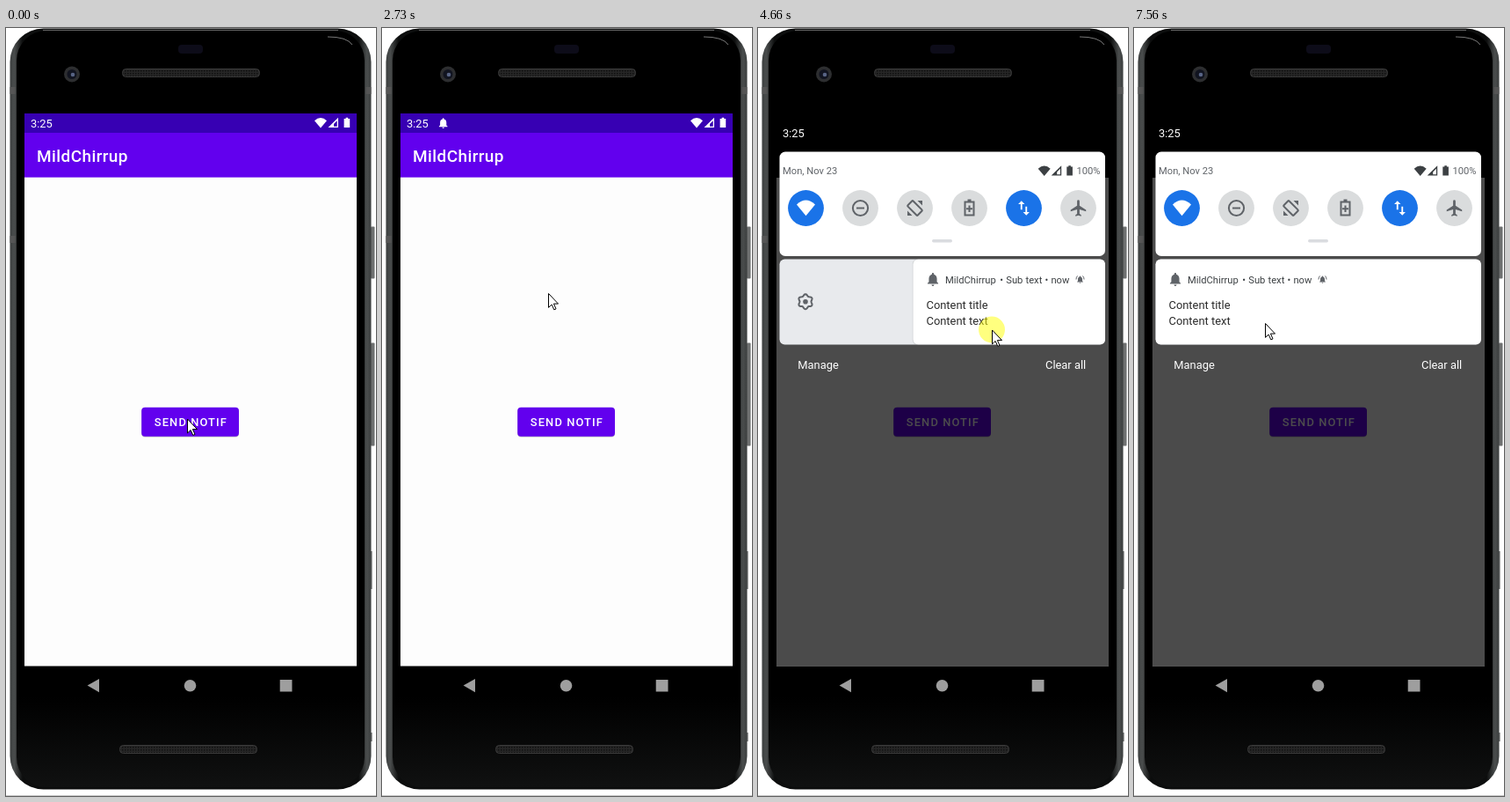
These frames come from a looping animation (421x872 px, 7730 ms). An HTML page:

```html
<!DOCTYPE html>
<html lang="en">
<head>
<meta charset="utf-8">
<title>Notification demo</title>
<style>
  html, body { margin: 0; width: 100%; height: 100%; overflow: hidden; background: #fff; }
  svg { display: block; width: 100vw; height: 100vh; }
  text { font-family: Roboto, sans-serif; font-size: 12.9px; white-space: pre; }
  .medium { font-weight: 500; }
  .small { font-size: 11.2px; }
  .line { fill: none; stroke: #5f6368; stroke-width: 2; }
</style>
</head>
<body>
<svg viewBox="0 0 421 872">
  <defs>
    <linearGradient id="shell" x2="1" y2="0">
      <stop offset="0" stop-color="#3c3f3f"/><stop offset=".012" stop-color="#4a4d4d"/>
      <stop offset=".035" stop-color="#0c0d0d"/><stop offset=".965" stop-color="#0c0d0d"/>
      <stop offset=".988" stop-color="#4a4d4d"/><stop offset="1" stop-color="#3c3f3f"/>
    </linearGradient>
    <linearGradient id="glass" x2="0" y2="1">
      <stop offset=".88" stop-color="#000"/><stop offset="1" stop-color="#101111"/>
    </linearGradient>
    <pattern id="mesh" width="3" height="3" patternUnits="userSpaceOnUse">
      <rect width="3" height="3" fill="#262626"/><rect width="1.5" height="1.5" fill="#101010"/>
    </pattern>
    <clipPath id="cardClip"><rect id="cardMask" x="24.5" y="262.5" width="370.5" height="97" rx="6"/></clipPath>
    <path id="fan" d="M0 3.3Q7-3.2 14 3.3L7 11.5Z"/>
    <path id="signal" fill-rule="evenodd" d="M11.5 0V11.3H0ZM10.2 3.5V10H6.5V7.2Z"/>
    <path id="battery" d="M2 0H4.6V1.2H6.6V11.3H0V1.2H2Z"/>
    <path id="bell" d="M0 10c1.1 0 2-.9 2-2h-4c0 1.1.9 2 2 2zm6-6v-5c0-3.07-1.64-5.64-4.5-6.32V-8c0-.83-.67-1.5-1.5-1.5S-1.5-8.83-1.5-8v.68C-4.37-6.64-6-4.08-6-1v5l-2 2v1H8V6z"/>
  </defs>

  <!-- phone -->
  <g fill="#6e7070">
    <rect x="415" y="225.5" width="4.5" height="59" rx="1"/>
    <rect x="415" y="357.5" width="4.5" height="117" rx="1"/>
    <path d="M415 594h1.6v43H415zM415 800h1.6v10H415z"/>
  </g>
  <rect x="4.5" y=".5" width="411" height="864" rx="38" fill="url(#shell)"/>
  <path d="M4.5 67h6v8h-6zM4.5 236h6v8h-6zM409.5 67h6v8h-6z" fill="#555"/>
  <rect x="12" y="3" width="396" height="859" rx="34" fill="url(#glass)"/>
  <path d="M42 2.5H378" stroke="#666"/>
  <path d="M366 10Q388 10 394 19" fill="none" stroke="#aaa" opacity=".7"/>
  <path d="M0 871.5H421" stroke="#c8c8c8"/>
  <rect x="196" y="19" width="28" height="10" rx="4" fill="#0d0c19"/>
  <circle cx="75" cy="52.5" r="9" fill="#2d2e30"/>
  <circle cx="75" cy="52.5" r="5.5" fill="#111420"/>
  <circle cx="76" cy="53" r="2.3" fill="#586485"/>
  <g fill="url(#mesh)" stroke="#3b3b3b">
    <rect x="132.5" y="46.5" width="156" height="9" rx="4"/>
    <rect x="129.5" y="814.5" width="156" height="9" rx="4"/>
  </g>
  <g fill="#9e9e9e">
    <path d="M92.6 746.5L106 739V754.2Z"/><circle cx="209.5" cy="746.7" r="6.8"/>
    <rect x="311.7" y="740" width="13.8" height="13.5"/>
  </g>

  <!-- app -->
  <rect x="21" y="97" width="378" height="627.5" fill="#fdfdfd"/>
  <rect x="21" y="119" width="378" height="50.6" fill="#6200ee"/>
  <rect x="21" y="97" width="378" height="22" fill="#3700b3"/>
  <g fill="#fff">
    <text x="28" y="112.6">3:25</text>
    <use href="#bell" id="statusBell" transform="translate(69.7 108) scale(.6)"/>
    <use href="#fan" x="351" y="102"/><use href="#signal" x="366.5" y="101.7"/><use href="#battery" x="384.6" y="101.7"/>
    <text class="medium" x="35" y="152" style="font-size:19px;letter-spacing:.4px">MildChirrup</text>
  </g>
  <rect x="154.2" y="431.6" width="110.8" height="33" rx="4" opacity=".25"/>
  <rect x="154.2" y="430.7" width="110.8" height="33" rx="4" fill="#6200ee"/>
  <rect id="ripple" x="154.2" y="430.7" width="110.8" height="33" rx="4" fill="#fff"/>
  <text class="medium" x="168.8" y="452.2" fill="#fff" style="letter-spacing:1.12px">SEND NOTIF</text>

  <!-- notification shade -->
  <g id="shade">
    <rect x="21" y="97" width="378" height="627.5" opacity=".7"/>
    <rect x="21" y="97" width="378" height="73"/>
    <text x="28" y="124" fill="#fff">3:25</text>
    <g id="panels">
      <rect x="24.5" y="140.5" width="370.5" height="118.5" rx="6.5" fill="#fff"/>
      <g fill="#5f6368">
        <text class="small" x="28" y="166">Mon, Nov 23</text>
        <text class="small" x="362.5" y="166">100%</text>
      </g>
      <g fill="#3c4043">
        <use href="#fan" x="318.7" y="156.5"/><use href="#signal" x="333.7" y="156.3"/><use href="#battery" x="351.3" y="156.3"/>
      </g>
      <g id="tiles"></g>
      <rect x="198" y="240" width="23" height="3.5" rx="1.7" fill="#dadce0"/>
      <g clip-path="url(#cardClip)">
        <rect x="24" y="262" width="372" height="98" fill="#e8eaed"/>
        <g id="gear" transform="translate(54 310.7)">
          <path id="gearRim" class="line" stroke-linejoin="round"/>
          <circle r="2.8" fill="#5f6368"/>
        </g>
        <g id="card">
          <rect x="23.7" y="262" width="372" height="98" rx="6" opacity=".1"/>
          <rect id="cardFace" x="24.5" y="262.5" width="370.5" height="97" rx="6" fill="#fff"/>
          <g fill="#5f6368">
            <use href="#bell" transform="translate(47 285.3) scale(.76)"/>
            <use href="#bell" transform="translate(214.5 285.6) scale(.42)"/>
            <path d="M211.5 281.5Q210 283 210 285.5M217.5 281.5Q219 283 219 285.5" fill="none" stroke="#5f6368"/>
          </g>
          <g fill="#3c4043">
            <text class="small" x="61" y="289.6">MildChirrup</text>
            <text class="small" x="123.3" y="289.6" style="word-spacing:.4px">• Sub text • now</text>
          </g>
          <g fill="#2b2b2b">
            <text x="39.5" y="318.5">Content title</text>
            <text x="39.5" y="336.7">Content text</text>
          </g>
        </g>
      </g>
    </g>
    <g id="footer" fill="#fff">
      <text x="45.3" y="387">Manage</text>
      <text x="327" y="387">Clear all</text>
    </g>
  </g>

  <g id="pointer">
    <circle id="press" r="15" fill="#ff0"/>
    <path d="M.5.5V16.4L4.1 13L6.8 18.9L9 17.9L6.4 12.1H11.5Z" fill="#fff" stroke="#000"/>
  </g>
</svg>
<script>
const LOOP = 7730, TICKS = 99, TICK = LOOP / TICKS;
const $ = id => document.getElementById(id);

const icons = [
  '<use href="#fan" transform="translate(-10.5 -9.2) scale(1.5 1.55)"/>',
  '<circle class="line" r="8.6"/><path class="line" d="M-4.5 0H4.5"/>',
  '<rect class="line" x="-8" y="-4.3" width="16" height="8.6" rx="1" transform="rotate(45)"/>' +
    '<path d="M3-8.5L8.5-3V-8.5ZM-3 8.5L-8.5 3V8.5Z"/>',
  '<path class="line" d="M-5-7H5V8H-5ZM0-3V4.5M-3.5.8H3.5"/><path d="M-2-10H2V-7H-2Z"/>',
  '<path transform="scale(.92)" d="M4 5V-2H2V5H-1L3 9L7 5ZM-3-9L-7-5H-4V2H-2V-5H1Z"/>',
  '<path transform="translate(-10.6 -11) scale(.92)" d="M21 16v-2l-8-5V3.5a1.5 1.5 0 0 0-3 0V9l-8 5v2l8-2.5V19l-2 1.5V22l3.5-1 3.5 1v-1.5L13 19v-5.5z"/>'
];
$('tiles').innerHTML = icons.map((icon, i) => {
  const on = i % 4 === 0;
  return `<g transform="translate(${54.5 + 62 * i} 204.5)" fill="${on ? '#fff' : '#5f6368'}">
    <circle r="20.4" fill="${on ? '#1a73e8' : '#dadcdd'}"/>${icon}</g>`;
}).join('');

const gearPoints = Array.from({ length: 48 }, (_, i) => {
  const angle = i * Math.PI / 24, r = 7.5 + Math.cos(6 * angle);
  return [r * Math.sin(angle), -r * Math.cos(angle)].map(v => v.toFixed(2));
});
$('gearRim').setAttribute('d', `M${gearPoints.join('L')}Z`);

const ramp = (k, from, to) => Math.min(1, Math.max(0, (k - from) / (to - from)));
const smooth = p => p * p * (3 - 2 * p);
const easeOut = p => 1 - (1 - p) ** 3;
const within = (k, from, to) => k >= from && k < to;

// Each leg of the pointer's way: where it ends, and its first and last tick
const button = { x: 206, y: 443.5 };
const legs = [
  { x: 196, y: 112, from: 16, to: 26 },
  { x: 189, y: 301, from: 27, to: 35 },
  { x: 114, y: 340, from: 45, to: 50 },
  { x: 266, y: 342.5, from: 51, to: 60 },
  { x: 105, y: 354, from: 61, to: 70 },
  { x: 166, y: 338, from: 71, to: 82 },
  { x: 106, y: 339, from: 85, to: 90 },
  { x: 149, y: 335, from: 91, to: 97 }
];

function pointerAt(k) {
  let { x, y } = button;
  for (const leg of legs) {
    const p = smooth(ramp(k, leg.from, leg.to));
    x += (leg.x - x) * p;
    y += (leg.y - y) * p;
  }
  return { x, y };
}

const isPressed = k =>
  k === 2 || within(k, 27, 35) || within(k, 50, 70) || within(k, 84, 90);

// The card follows the pressed pointer and settles once released
function cardOffset(k, pointerX) {
  if (within(k, 51, 70)) return pointerX - 114;
  if (within(k, 70, 84)) return -9 + 69 * easeOut(ramp(k, 70, 76));
  if (within(k, 84, 90)) return pointerX - 106;
  return 0;
}

const fade = (id, opacity) => $(id).setAttribute('opacity', opacity);
const move = (id, x, y) => $(id).setAttribute('transform', `translate(${x} ${y})`);

function draw(time) {
  const k = Math.floor((time % LOOP + 35) / TICK);
  const { x, y } = pointerAt(k);

  move('pointer', x, y);
  fade('press', isPressed(k) ? .5 : 0);
  fade('ripple', k < 5 ? 0 : .2 * (1 - ramp(k, 7, 10)));
  fade('statusBell', k < 16 ? 0 : .6 + .4 * ramp(k, 16, 18));

  fade('shade', k < 37 ? 0 : 1);
  move('panels', 0, -20 * (1 - ramp(k, 37, 39)));
  fade('footer', ramp(k, 41, 44));
  fade('gear', ramp(k, 56, 59));
  move('card', cardOffset(k, x), 0);
  for (const id of ['cardMask', 'cardFace']) $(id).setAttribute('height', k < 40 ? 85.5 : 97);
}

const start = performance.now();
function tick() {
  draw(performance.now() - start);
  requestAnimationFrame(tick);
}
tick();
</script>
</body>
</html>
```
